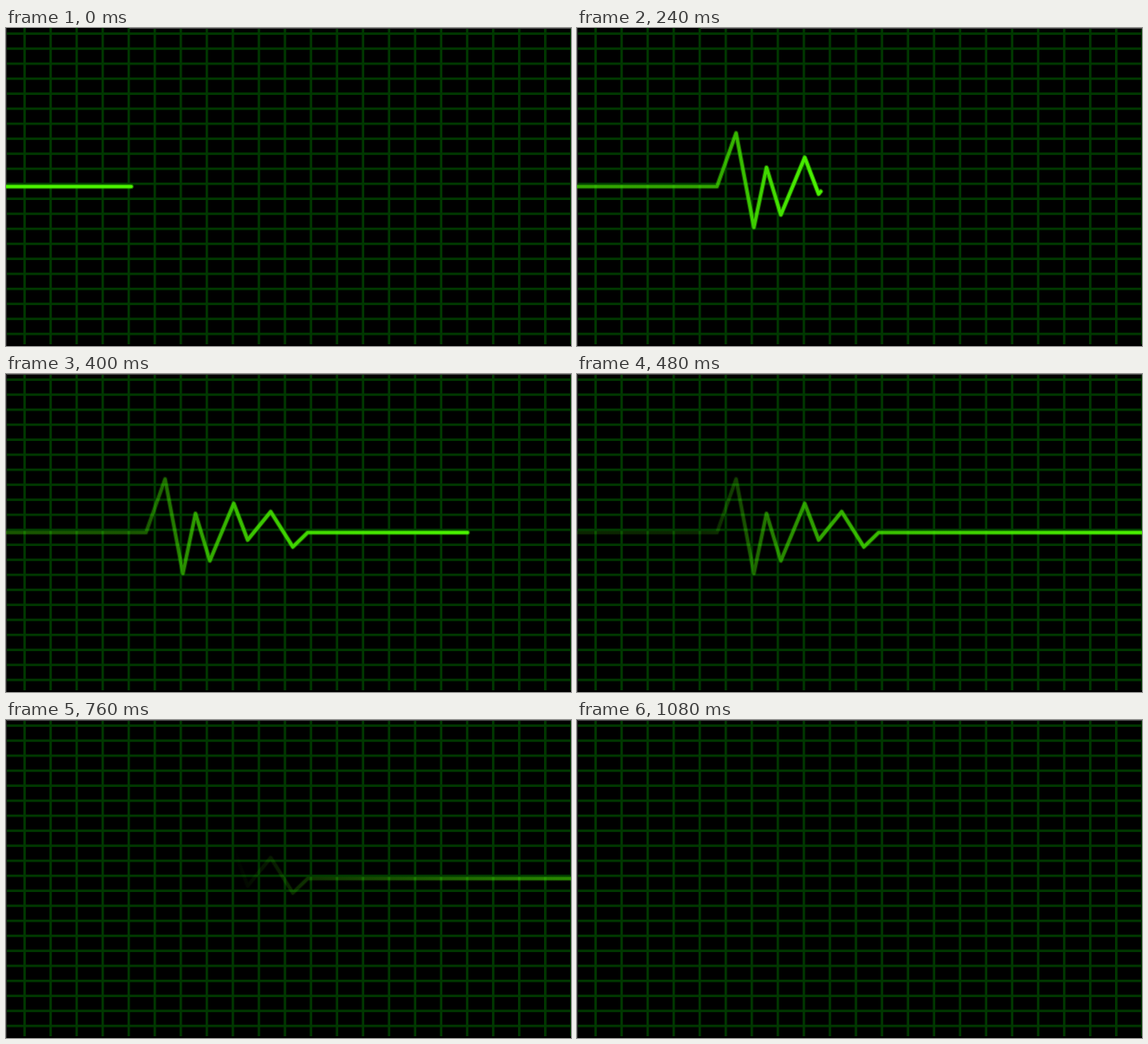
Recreate the animation shown at these times as an HTML page with a canvas. Size 650 px wide and 366 px high, loop 1120 ms.

```html
<!DOCTYPE html>
<html lang="en">
<head>
<meta charset="utf-8">
<title>Heartbeat monitor</title>
<style>
html, body { margin: 0; width: 100%; height: 100%; overflow: hidden; background: #000; }
canvas { display: block; }
</style>
</head>
<body>
<canvas width="650" height="366"></canvas>
<script>
const W = 650, H = 366, LOOP = 1120, STEP = 40;
const SPEED = 1.835; // path pixels per ms
const LIFE = 540;    // afterglow in ms
const ctx = document.querySelector('canvas').getContext('2d');
const clamp = v => Math.max(0, Math.min(1, v));

// The first stretch is already lit when the sweep starts.
const pulse = [[0, 182.5], [144, 182.5], [161, 182.5], [183, 121], [203.5, 229.5],
  [218, 160.5], [234.5, 215], [262, 149], [278, 191], [304.5, 158.5],
  [330, 199], [347, 182.5], [660, 182.5]].map(([x, y]) => ({ x, y, born: 0 }));
for (let i = 2; i < pulse.length; i++) {
  const a = pulse[i - 1], b = pulse[i];
  b.born = a.born + Math.hypot(b.x - a.x, b.y - a.y) / SPEED;
}

function drawGrid(t) {
  ctx.fillStyle = '#000';
  ctx.fillRect(0, 0, W, H);
  ctx.fillStyle = '#003800';
  for (let i = 0; i < 22; i++) ctx.fillRect(20 + i * 29.95, 0, 2.8, 364);
  for (let i = 0; i < 21; i++) ctx.fillRect(0, 5.1 + i * 17.28, W, 2.8);
  ctx.fillStyle = '#484848';
  const left = t < 320 ? 142 : 0;
  ctx.fillRect(left, 0, W - left, 1);
  ctx.fillStyle = '#2c2c2c';
  ctx.fillRect(0, 0, 1, H);
}

function litPoints(t) {
  const next = pulse.findIndex(p => p.born > t);
  if (next < 0) return pulse;
  const a = pulse[next - 1], b = pulse[next];
  const k = (t - a.born) / (b.born - a.born);
  const head = { x: a.x + (b.x - a.x) * k, y: a.y + (b.y - a.y) * k, born: t };
  return [...pulse.slice(0, next), head];
}

function drawPulse(t) {
  const points = litPoints(t);
  const dim = clamp((900 - t) / 140);
  const glow = (rgb, width, strength) => {
    const fade = ctx.createLinearGradient(0, 0, W + 10, 0);
    for (const p of points) {
      const alpha = clamp(1 - (t - p.born) / LIFE) * dim * strength;
      fade.addColorStop(p.x / (W + 10), `rgba(${rgb},${alpha})`);
    }
    ctx.strokeStyle = fade;
    ctx.lineWidth = width;
    ctx.beginPath();
    for (const p of points) ctx.lineTo(p.x, p.y);
    ctx.stroke();
  };
  ctx.lineCap = ctx.lineJoin = 'round';
  glow('50,190,0', 5.6, 0.6);
  glow('74,242,0', 3.6, 1);
}

function frame(now) {
  const t = Math.floor(now % LOOP / STEP) * STEP;
  drawGrid(t);
  drawPulse(t);
  requestAnimationFrame(frame);
}

let start;
requestAnimationFrame(function begin(now) {
  start = now;
  const tick = time => {
    const t = Math.floor((time - start) % LOOP / STEP) * STEP;
    drawGrid(t);
    drawPulse(t);
    requestAnimationFrame(tick);
  };
  tick(now);
});
</script>
</body>
</html>
```
